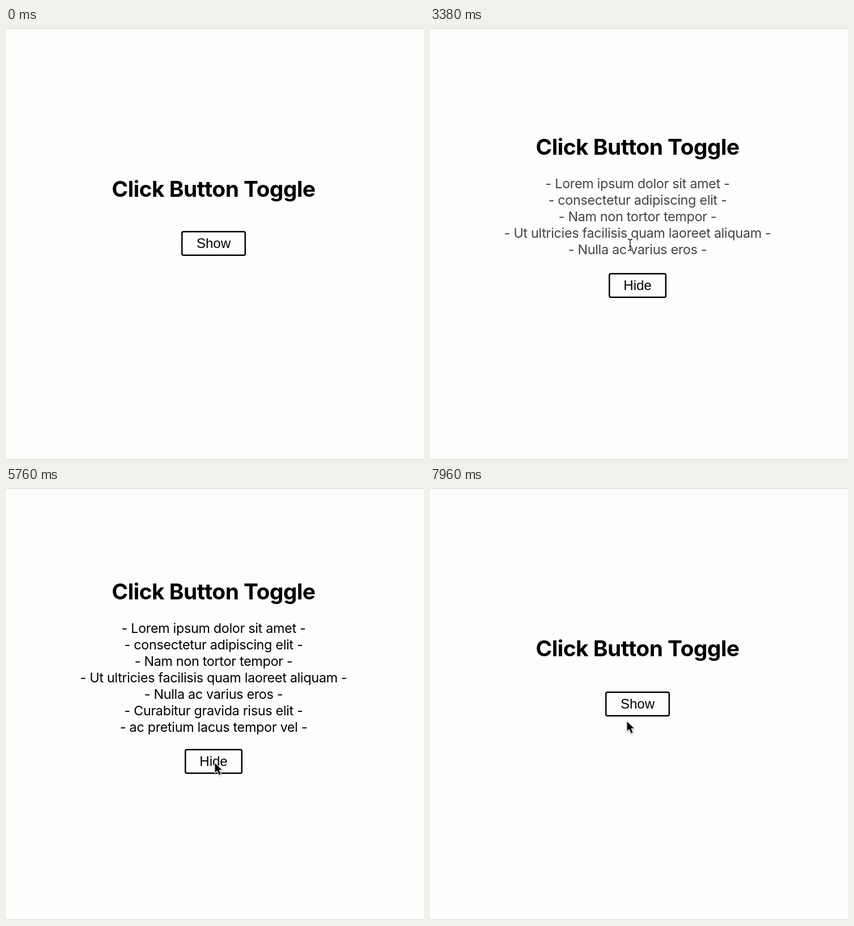
These frames come from a looping animation (737x760 px, 8 s). An HTML page:

```html
<!DOCTYPE html>
<html lang="en">
<head>
<meta charset="utf-8">
<title>Click Button Toggle</title>
<style>
  /* Current height of the collapsible list, in pixels */
  @property --open { syntax: "<number>"; inherits: true; initial-value: 0; }

  html, body { margin: 0; width: 100%; height: 100%; overflow: hidden; background: #fdfdfc; }

  .stage {
    position: relative;
    width: 737px;
    height: 760px;
    overflow: hidden;
    box-sizing: border-box;
    border-top: 1px solid #cfcfda;
    border-bottom: 1px solid #d4d4d8;
    color: #000;
    animation: toggle 8s infinite;
  }
  .stage > * { position: absolute; margin: 0; }

  h1, .list, .button {
    left: 0;
    width: 732px;
    text-align: center;
    white-space: nowrap;
    font-optical-sizing: none;
  }
  h1 {
    top: calc(258px - var(--open) * .5px);
    font: 700 38.8px/48px Inter, sans-serif;
    letter-spacing: -.48px;
  }
  .list {
    top: calc(332.5px - var(--open) * .5px);
    height: calc(var(--open) * 1px);
    overflow: hidden;
    opacity: calc(var(--open) / 203);
    font: 400 23.3px/29px Inter, sans-serif;
    letter-spacing: -.29px;
  }
  .button {
    top: calc(356px + var(--open) * .5px);
    font: 24px/44px "Liberation Sans", Arial, sans-serif;
  }
  .button span {
    display: inline-block;
    height: 44px;
    padding: 0 26.5px;
    border-radius: 4px;
    box-shadow: inset 0 0 0 2.5px #000;
  }
  .show { animation: show-label 8s step-end infinite; }
  .hide { animation: hide-label 8s step-end infinite; }

  .cursor {
    left: 0;
    top: -1px;
    width: 1px;
    height: 1px;
    overflow: visible;
    animation: move 8s infinite ease-in-out, appear 8s step-end infinite;
  }
  .arrow {
    filter: drop-shadow(0 1px 1px rgba(0, 0, 0, .35));
    animation: arrow 8s step-end infinite;
  }
  .arrow path { stroke: #fff; stroke-width: 2.4; stroke-linejoin: round; paint-order: stroke; }
  .beam { fill: none; animation: beam 8s step-end infinite; }

  @keyframes toggle {
    0%, 34.625% { --open: 0; animation-timing-function: ease; }
    52.125%, 79.275% { --open: 203; animation-timing-function: ease; }
    95.525%, 100% { --open: 1.2; }
  }
  @keyframes show-label {
    0%, 79.275% { visibility: visible; }
    34.625% { visibility: hidden; }
  }
  @keyframes hide-label {
    0%, 79.275% { visibility: hidden; }
    34.625% { visibility: visible; }
  }
  @keyframes appear {
    0% { visibility: hidden; }
    .25%, 100% { visibility: visible; }
  }
  @keyframes arrow {
    0%, 51.4% { visibility: inherit; }
    39.4% { visibility: hidden; }
  }
  @keyframes beam {
    0%, 51.4% { visibility: hidden; }
    39.4% { visibility: inherit; }
  }
  @keyframes move {
    0%, .25% { transform: translate(508px, 752px); animation-timing-function: linear; }
    3.5% { transform: translate(430px, 470px); animation-timing-function: ease-out; }
    6% { transform: translate(240px, 284px); }
    7% { transform: translate(205px, 305px); }
    10.25% { transform: translate(291px, 423px); }
    19.5%, 20.75% { transform: translate(319px, 386px); }
    26.5%, 47% { transform: translate(352px, 379px); }
    54% { transform: translate(358px, 464px); }
    56.25% { transform: translate(359px, 466px); }
    63%, 65% { transform: translate(368px, 484px); }
    73.5%, 85.25% { transform: translate(368px, 483px); }
    89%, 90.5% { transform: translate(362.5px, 488px); }
    94.75%, 96% { transform: translate(352px, 416px); }
    99.5%, 100% { transform: translate(347px, 410px); }
  }
</style>
</head>
<body>
<main class="stage">
  <h1>Click Button Toggle</h1>
  <div class="list">
    <div>- Lorem ipsum dolor sit amet -</div>
    <div>- consectetur adipiscing elit -</div>
    <div>- Nam non tortor tempor -</div>
    <div>- Ut ultricies facilisis quam laoreet aliquam -</div>
    <div>- Nulla ac varius eros -</div>
    <div>- Curabitur gravida risus elit -</div>
    <div>- ac pretium lacus tempor vel -</div>
  </div>
  <div class="button show"><span>Show</span></div>
  <div class="button hide"><span>Hide</span></div>
  <svg class="cursor">
    <g class="arrow"><path d="M.5 1V17.5l3.8-3.6 3.3 7.7 3-1.3-3.2-7.5h5.2z"/></g>
    <g class="beam">
      <path id="ibeam" d="M-3-7.5Q1-7.5 1-5V10Q1 12.5-3 12.5M5-7.5Q1-7.5 1-5M1 10Q1 12.5 5 12.5M-1 5H3" stroke="#fff" stroke-width="3.4"/>
      <use href="#ibeam" style="display:none"/>
      <path d="M-3-7.5Q1-7.5 1-5V10Q1 12.5-3 12.5M5-7.5Q1-7.5 1-5M1 10Q1 12.5 5 12.5M-1 5H3" stroke="#222" stroke-width="1.5"/>
    </g>
  </svg>
</main>
</body>
</html>
```
